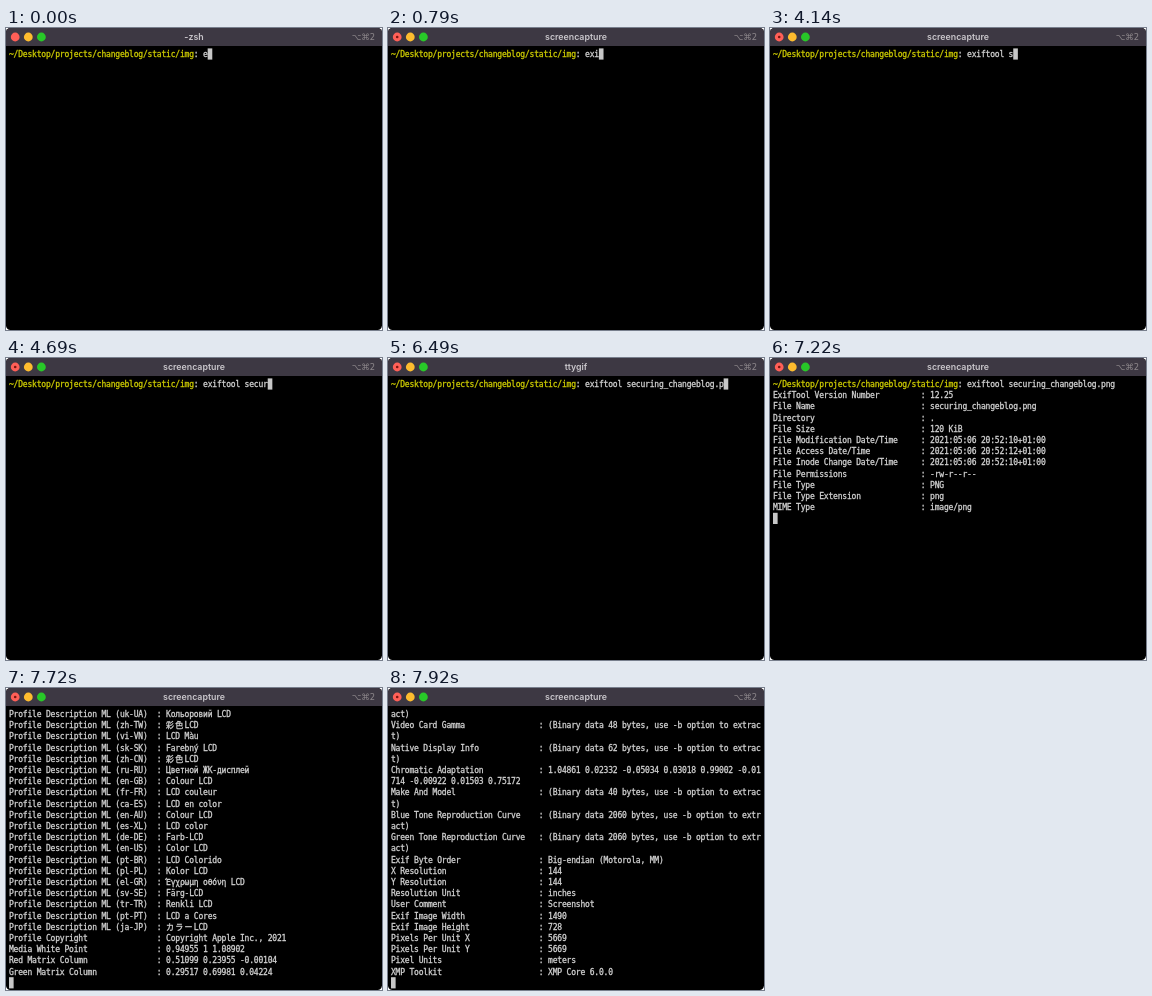
These frames come from a looping animation (376x302 px, 8 s). An HTML page with a canvas:

```html
<!DOCTYPE html>
<html lang="en">
<head>
<meta charset="utf-8">
<title>Terminal session</title>
<style>
html, body { margin: 0; width: 100%; height: 100%; overflow: hidden; background: #fff; }
canvas { display: block; width: 376px; height: 302px; }
</style>
</head>
<body>
<canvas id="stage"></canvas>
<script>
const W = 376, H = 302, LOOP = 8000;
const CELL = 4.62, ROW = 11.2, LEFT = 3, TOP = 20.4, COLS = 80, ROWS = 25;
const PATH = '~/Desktop/projects/changeblog/static/img';
const TEXT = '#d2d2d2', PATH_COLOR = '#cdcb00', CURSOR = '#c7c7c7';
const ENTER = 7120, STEP = 100, STEPS_TO_MIDDLE = 4;

const TYPED = [
  [0, 'e'], [540, 'ex'], [790, 'exi'], [2310, 'exif'], [2580, 'exift'],
  [2890, 'exiftool '], [4140, 'exiftool s'], [4250, 'exiftool se'],
  [4430, 'exiftool sec'], [4600, 'exiftool secu'], [4690, 'exiftool secur'],
  [5550, 'exiftool securing_changeblog'], [6230, 'exiftool securing_changeblog.'],
  [6490, 'exiftool securing_changeblog.p'], [6670, 'exiftool securing_changeblog.pn'],
  [6820, 'exiftool securing_changeblog.png']
];
const TITLES = [[0, '-zsh'], [540, 'screencapture'], [6490, 'ttygif'], [6670, 'screencapture']];

const binary = size => `(Binary data ${size} bytes, use -b option to extract)`;

// A key such as "hr-HR" is a localized profile description.
const HEAD = `ExifTool Version Number=12.25
File Name=securing_changeblog.png
Directory=.
File Size=120 KiB
File Modification Date/Time=2021:05:06 20:52:10+01:00
File Access Date/Time=2021:05:06 20:52:12+01:00
File Inode Change Date/Time=2021:05:06 20:52:10+01:00
File Permissions=-rw-r--r--
File Type=PNG
File Type Extension=png
MIME Type=image/png
Image Width=1490
Image Height=728
Bit Depth=8
Color Type=RGB with Alpha
Compression=Deflate/Inflate
Filter=Adaptive
Interlace=Noninterlaced
Profile Name=ICC Profile
Profile CMM Type=Apple Computer Inc.
Profile Version=2.1.0
Profile Class=Display Device Profile
Color Space Data=RGB
Profile Connection Space=XYZ
Profile Date Time=2021:05:06 20:49:43
Profile File Signature=acsp
Primary Platform=Apple Computer Inc.
CMM Flags=Not Embedded, Independent
Device Manufacturer=Apple Computer Inc.
Device Model=
Device Attributes=Reflective, Glossy, Positive, Color
Rendering Intent=Perceptual
Connection Space Illuminant=0.9642 1 0.82491
Profile Creator=Apple Computer Inc.
Profile ID=0
Profile Description=Display
hr-HR=LCD u boji
ko-KR=컬러 LCD
nb-NO=Farge-LCD
hu-HU=Színes LCD
cs-CZ=Barevný LCD
da-DK=LCD-farveskærm
nl-NL=Kleuren-LCD
fi-FI=Väri-LCD
it-IT=LCD a colori`;

const TAIL = `es-ES=LCD color
ro-RO=LCD color
fr-CA=ACL couleur
uk-UA=Кольоровий LCD
zh-TW=彩色LCD
vi-VN=LCD Màu
sk-SK=Farebný LCD
zh-CN=彩色LCD
ru-RU=Цветной ЖК-дисплей
en-GB=Colour LCD
fr-FR=LCD couleur
ca-ES=LCD en color
en-AU=Colour LCD
es-XL=LCD color
de-DE=Farb-LCD
en-US=Color LCD
pt-BR=LCD Colorido
pl-PL=Kolor LCD
el-GR=Έγχρωμη οθόνη LCD
sv-SE=Färg-LCD
tr-TR=Renkli LCD
pt-PT=LCD a Cores
ja-JP=カラーLCD
Profile Copyright=Copyright Apple Inc., 2021
Media White Point=0.94955 1 1.08902
Red Matrix Column=0.51099 0.23955 -0.00104
Green Matrix Column=0.29517 0.69981 0.04224
Blue Matrix Column=0.15805 0.06064 0.78369
Red Tone Reproduction Curve=${binary(2060)}
Video Card Gamma=${binary(48)}
Native Display Info=${binary(62)}
Chromatic Adaptation=1.04861 0.02332 -0.05034 0.03018 0.99002 -0.01714 -0.00922 0.01503 0.75172
Make And Model=${binary(40)}
Blue Tone Reproduction Curve=${binary(2060)}
Green Tone Reproduction Curve=${binary(2060)}
Exif Byte Order=Big-endian (Motorola, MM)
X Resolution=144
Y Resolution=144
Resolution Unit=inches
User Comment=Screenshot
Exif Image Width=1490
Exif Image Height=728
Pixels Per Unit X=5669
Pixels Per Unit Y=5669
Pixel Units=meters
XMP Toolkit=XMP Core 6.0.0`;

function format(record) {
  const [key, value] = record.split('=');
  const label = /^[a-z]{2}-[A-Z]{2}$/.test(key) ? `Profile Description ML (${key})` : key;
  return `${label.padEnd(32)}: ${value}`;
}

const wrap = line => line.match(new RegExp(`.{1,${COLS}}`, 'g'));
const layout = text => text.split('\n').map(format).flatMap(wrap);
const head = layout(HEAD), tail = layout(TAIL), output = [...head, ...tail];

const canvas = document.getElementById('stage');
const ctx = canvas.getContext('2d');
const ratio = window.devicePixelRatio || 1;
canvas.width = W * ratio;
canvas.height = H * ratio;
ctx.scale(ratio, ratio);

const valueAt = (track, t) => track.filter(([start]) => start <= t).pop()[1];

function drawLine(text, row) {
  ctx.font = '8px "DejaVu Sans Mono", "Noto Sans CJK KR", "Noto Sans CJK", monospace';
  ctx.textAlign = 'left';
  ctx.lineWidth = 0.3;
  const y = TOP + row * ROW + 8.6;
  let col = 0;
  for (const char of text) {
    const inPath = text.startsWith(PATH) && col < PATH.length;
    ctx.fillStyle = ctx.strokeStyle = inPath ? PATH_COLOR : TEXT;
    if (char !== ' ') {
      ctx.fillText(char, LEFT + col * CELL, y);
      ctx.strokeText(char, LEFT + col * CELL, y);
    }
    col += /[\u3000-\u9fff\uac00-\ud7af]/.test(char) ? 2 : 1;
  }
}

function drawCursor(col, row) {
  ctx.fillStyle = CURSOR;
  ctx.fillRect(LEFT + col * CELL, TOP + row * ROW, CELL, ROW);
}

function drawDot(x, color, radius = 4.4) {
  ctx.fillStyle = color;
  ctx.beginPath();
  ctx.arc(x, 9, radius, 0, 2 * Math.PI);
  ctx.fill();
}

function drawTitleBar(t) {
  ctx.fillStyle = '#3d3843';
  ctx.fillRect(0, 0, W, 18);
  drawDot(9.2, '#ff5f57');
  drawDot(22.3, '#febc2e');
  drawDot(35.4, '#28c828');
  if (t >= 540) drawDot(9.2, '#7a1510', 1.3);
  ctx.font = '600 8.8px Inter, sans-serif';
  ctx.textAlign = 'center';
  ctx.fillStyle = '#cbc8cd';
  ctx.fillText(valueAt(TITLES, t), W / 2, 12);
  ctx.font = '8.4px "DejaVu Sans", sans-serif';
  ctx.textAlign = 'right';
  ctx.fillStyle = '#8e888c';
  ctx.fillText('⌥⌘2', 369, 11.6);
}

function linesPrinted(t) {
  const step = Math.floor((t - ENTER) / STEP);
  const first = Math.min(step / STEPS_TO_MIDDLE, 1);
  const second = Math.max(step / STEPS_TO_MIDDLE - 1, 0);
  return Math.round(head.length * first + tail.length * second);
}

function drawTerminal(t) {
  const prompt = `${PATH}: ${valueAt(TYPED, t)}`;
  if (t < ENTER) {
    drawLine(prompt, 0);
    drawCursor(prompt.length, 0);
    return;
  }
  const lines = [prompt, ...output.slice(0, linesPrinted(t))].slice(1 - ROWS);
  lines.forEach(drawLine);
  drawCursor(0, lines.length);
}

function render(t) {
  ctx.fillStyle = '#fff';
  ctx.fillRect(0, 0, W, H);
  ctx.save();
  ctx.beginPath();
  ctx.roundRect(0, 0, W, H, 4.5);
  ctx.clip();
  ctx.fillStyle = '#000';
  ctx.fillRect(0, 0, W, H);
  drawTitleBar(t);
  drawTerminal(t);
  ctx.restore();
}

const start = performance.now();
function tick() {
  render((performance.now() - start) % LOOP);
  requestAnimationFrame(tick);
}
tick();
</script>
</body>
</html>
```
